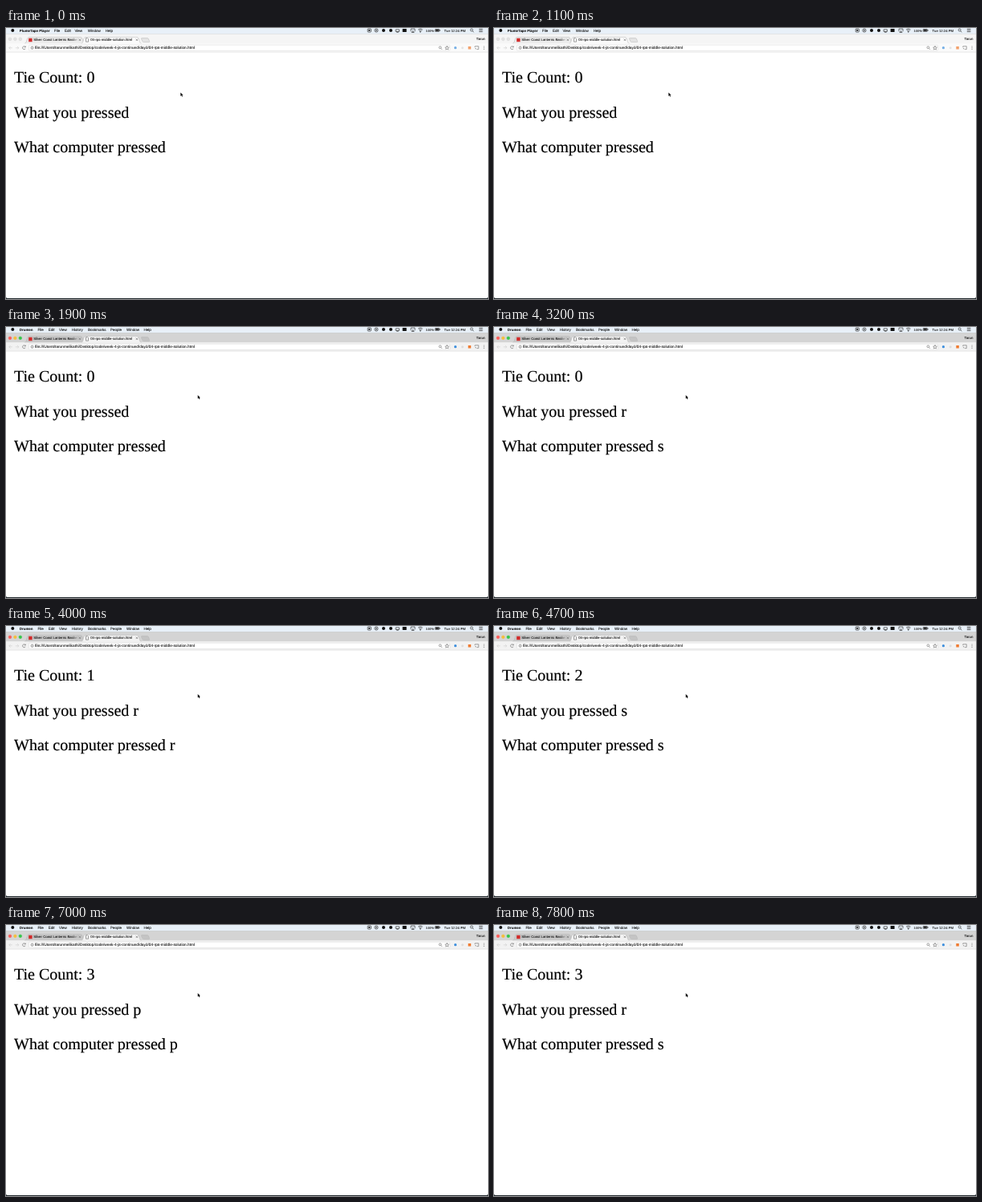
Recreate the animation shown at these times as an HTML page. Size 600 by 338 pixels, loop 8 s.

```html
<!DOCTYPE html>
<html lang="en">
<head>
<meta charset="utf-8">
<title>Rock paper scissors</title>
<style>
html, body { margin: 0; width: 100%; height: 100%; overflow: hidden; background: #fff; }
svg { display: block; width: 600px; height: 338px; }
text { white-space: pre; text-rendering: geometricPrecision; }
.ui { font: 4.5px "Liberation Sans", Arial, sans-serif; fill: #111; stroke: #111; stroke-width: .08; }
.app { font-weight: bold; font-size: 4.41px; }
.tab { font-size: 4.3px; }
.clock { font-size: 4.25px; }
.battery { font-size: 4px; }
.url { font-size: 4.75px; }
.page { font: 20px "Liberation Serif", "Times New Roman", serif; fill: #000; stroke: #000; stroke-width: .2; }
.line { fill: none; stroke: #222; stroke-width: .65; }
.soft { fill: none; stroke: #666; stroke-width: .6; }
.faint { fill: none; stroke: #ccc; stroke-width: .6; }
</style>
</head>
<body>
<svg viewBox="0 0 600 338">
  <defs>
    <linearGradient id="fade" x1="0" x2="1">
      <stop id="fadeStart" offset="0" stop-opacity="0"/>
      <stop id="fadeEnd" offset="1"/>
    </linearGradient>
    <clipPath id="titleClip"><rect x="34" y="9" width="56" height="10"/></clipPath>
  </defs>
  <rect width="600" height="338" fill="#222a2e"/>
  <rect width="600" height="337" rx="1.8" fill="#fff"/>

  <!-- menu bar -->
  <rect width="600" height="7" fill="#e8f0f8"/>
  <circle cx="8.3" cy="3" r="2" fill="#111"/>
  <g id="menus" class="ui"></g>
  <g transform="translate(0 -.3)">
    <g class="line">
      <rect x="450.2" y="1.2" width="4.2" height="4.2" rx=".8"/>
      <circle cx="461" cy="3.3" r="2.1"/>
      <path d="M485.2 2.2h4.2v2.6h-4.2zM486.2 5.6h2.4"/>
      <path d="M504 4.6v-3.2h5v3.2M505 5.8l1.5-2 1.5 2z"/>
      <path d="M513 2.4q2.8-2.5 5.6 0M514 3.7q1.8-1.6 3.6 0"/>
      <rect x="534.2" y="1.8" width="5.2" height="2.9" rx=".5"/>
      <circle cx="579.6" cy="2.8" r="1.5"/>
      <path d="M580.7 4l1.5 1.6M588.8 1.6h4.6M588.8 3.3h4.6M588.8 5h4.6"/>
    </g>
    <g fill="#111">
      <rect x="451.4" y="2.4" width="1.8" height="1.8"/>
      <circle cx="461" cy="3.3" r=".8"/>
      <circle cx="470" cy="3.3" r="2"/>
      <circle cx="479" cy="3.3" r="2"/>
      <rect x="493.6" y="1.3" width="5" height="4" rx=".6"/>
      <circle cx="515.8" cy="5" r=".8"/>
      <rect x="534.8" y="2.4" width="4" height="1.7"/>
      <rect x="539.8" y="2.6" width=".7" height="1.3"/>
    </g>
  </g>
  <g class="ui">
    <text class="battery" x="522.6" y="4.5">100%</text>
    <text class="clock" x="545.6" y="4.5">Tue 12:24 PM</text>
  </g>

  <!-- tab strip -->
  <rect id="strip" y="7" width="600" height="12.5"/>
  <rect y="7" width="600" height=".4" fill="#c8ccd0"/>
  <g id="lights"></g>
  <g stroke="#b5b5b5" stroke-width=".5">
    <path id="backTab" d="M23 19.4q1.6 0 2.2-2l1.6-4.4q.6-1.6 2-1.6h64q1.4 0 2 1.6l1.6 4.4q.6 2 2.2 2"/>
    <path id="newTab" d="M169 12.6h7q1 0 1.4 1l1.2 3q.3 1-.7 1h-6.6q-1 0-1.4-1l-1.4-3q-.3-1 .5-1z"/>
    <path id="frontTab" d="M93.4 19.6q1.6 0 2.2-2l1.6-4.6q.6-1.6 2-1.6h63.8q1.4 0 2 1.6l1.6 4.6q.6 2 2.2 2"/>
  </g>
  <rect x="28.2" y="12.8" width="4.4" height="4.4" fill="#d22a2a"/>
  <g class="ui tab">
    <text x="34.2" y="16.2" clip-path="url(#titleClip)">Silver Coast Lanterns Basketball</text>
    <rect x="82" y="12.4" width="8" height="6" fill="url(#fade)" stroke="none"/>
    <text x="105.2" y="16.2">04-rps-middle-solution.html</text>
    <text x="585.6" y="15.2">Tarun</text>
  </g>
  <path class="soft" d="M90.7 13.6l2.4 2.4m0-2.4l-2.4 2.4M161.7 13.6l2.4 2.4m0-2.4l-2.4 2.4M99.5 12.6h2l1 1v3.6h-3z"/>

  <!-- toolbar -->
  <rect id="bar" y="19.5" width="600" height="10.6"/>
  <rect y="29.8" width="600" height=".5" fill="#cfcfcf"/>
  <rect x="28.6" y="21.2" width="523.9" height="7.2" rx="1" fill="#fff" stroke="#d0d0d0" stroke-width=".4"/>
  <path class="faint" d="M7.8 24.8h-4m1.7-1.7l-1.7 1.7 1.7 1.7M11.8 24.8h4m-1.7-1.7l1.7 1.7-1.7 1.7"/>
  <path class="soft" d="M24 23.6a1.9 1.9 0 1 0 .2 2M24.3 22.5v1.4h-1.4"/>
  <circle class="soft" cx="32.6" cy="24.7" r="1.6"/>
  <path class="soft" d="M32.6 24.4v1.2M32.6 23.5v.4"/>
  <text class="ui url" x="36" y="26.1">file:///Users/tarunmelikathi/Desktop/code/week-4-js-continued/day3/04-rps-middle-solution.html</text>
  <g class="soft">
    <circle cx="540.4" cy="24.3" r="1.4"/>
    <path d="M541.4 25.4l1.5 1.5"/>
    <path d="M549 22.4l.7 1.6 1.7.2-1.3 1.1.4 1.7-1.5-.9-1.5.9.4-1.7-1.3-1.1 1.7-.2z"/>
    <path d="M583.8 24v-1.2h4.4v3.8h-2M583.8 25.2q1.4 0 1.4 1.4"/>
  </g>
  <g id="addons">
    <circle cx="559.4" cy="24.7" r="1.6" fill="#3d8fdd"/>
    <circle cx="568.2" cy="24.7" r="1.5" fill="#dcdcdc"/>
    <rect x="575.3" y="23" width="3.5" height="3.5" fill="#ef7a30"/>
  </g>
  <g fill="#666">
    <circle cx="595" cy="23.1" r=".5"/><circle cx="595" cy="24.8" r=".5"/><circle cx="595" cy="26.5" r=".5"/>
  </g>

  <!-- page -->
  <g class="page">
    <text id="ties" x="10" y="68.4"></text>
    <text id="you" x="10" y="111.7"></text>
    <text id="computer" x="10" y="155"></text>
  </g>
  <path id="cursor" d="M0 0v4.5l1.05-.95.75 1.75.8-.35-.75-1.7h1.4z" fill="#000" stroke="#fff" stroke-width=".5" paint-order="stroke"/>
</svg>
<script>
const LOOP = 8000, SWITCH = 1800, FOCUS = 1900;
const $ = id => document.getElementById(id);
const fill = (id, color) => $(id).setAttribute('fill', color);

// start time, ties, your key, computer's key
const rounds = [
  [0, 0, '', ''],
  [2400, 0, 'r', 'p'],
  [3200, 0, 'r', 's'],
  [3800, 1, 'r', 'r'],
  [4700, 2, 's', 's'],
  [6600, 3, 'p', 'p'],
  [7800, 3, 'r', 's']
];

const playerMenu = [['PlumeTape Player', 16.8], ['File', 60], ['Edit', 73], ['View', 85.4], ['Window', 101.8], ['Help', 123.8]];
const browserMenu = [['Drumen', 16.8], ['File', 39.4], ['Edit', 52.8], ['View', 66], ['History', 81.8],
  ['Bookmarks', 102], ['People', 130], ['Window', 150], ['Help', 171.4]];

const menuText = items => items.map(([label, x], i) =>
  `<text x="${x}" y="4.5"${i ? '' : ' class="app"'}>${label}</text>`).join('');
$('menus').innerHTML = `<g id="player">${menuText(playerMenu)}</g><g id="browser">${menuText(browserMenu)}</g>`;
$('lights').innerHTML = [5, 11.4, 17.8].map(x => `<circle cx="${x}" cy="13.8" r="1.9" stroke-width=".4"/>`).join('');

function setFocus(on) {
  const tab = on ? '#c8c8c8' : '#ececec';
  const bar = on ? '#f2f2f2' : '#fafafa';
  fill('strip', on ? '#d4d4d4' : '#f5f5f5');
  fill('newTab', on ? '#c4c4c4' : '#e4e4e4');
  fill('backTab', tab);
  fill('frontTab', bar);
  fill('bar', bar);
  $('fadeStart').setAttribute('stop-color', tab);
  $('fadeEnd').setAttribute('stop-color', tab);
  const colors = on ? ['#fc5b57', '#f5be3c', '#35c649'] : ['#e2e2e2', '#e2e2e2', '#e2e2e2'];
  [...$('lights').children].forEach((dot, i) => {
    dot.setAttribute('fill', colors[i]);
    dot.setAttribute('stroke', on ? colors[i] : '#cdcdcd');
  });
  $('addons').setAttribute('opacity', on ? 1 : .7);
}

function draw(t) {
  const [, ties, you, computer] = rounds.filter(r => r[0] <= t).pop();
  $('ties').textContent = 'Tie Count: ' + ties;
  $('you').textContent = 'What you pressed ' + you;
  $('computer').textContent = 'What computer pressed ' + computer;

  $('player').style.display = t < SWITCH ? '' : 'none';
  $('browser').style.display = t < SWITCH ? 'none' : '';
  setFocus(t >= FOCUS);

  const step = Math.floor(t / 100) * 100;
  const p = Math.max(0, Math.min(1, (step - 1500) / 200));
  $('cursor').setAttribute('transform', `translate(${217.3 + 21.4 * p} ${80.5 + 4.4 * p})`);
}

const start = performance.now();
function tick() {
  draw((performance.now() - start) % LOOP);
  requestAnimationFrame(tick);
}
tick();
</script>
</body>
</html>
```
